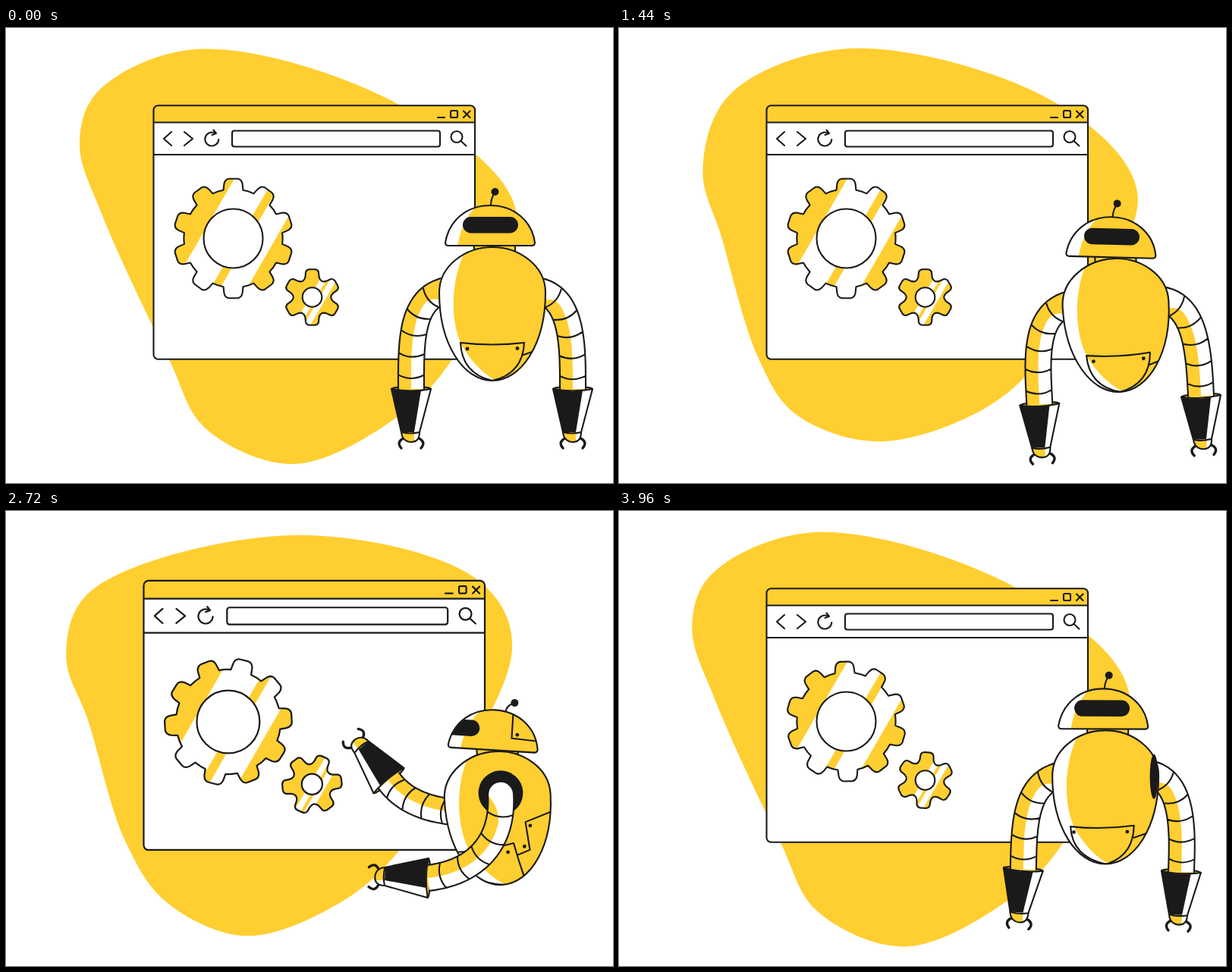
Recreate the animation shown at these times as an HTML page. Size 800 by 600 pixels, loop 4 s.

```html
<!DOCTYPE html>
<html lang="en">
<head>
<meta charset="utf-8">
<title>Robot and gears</title>
<style>
  html, body { margin: 0; width: 100%; height: 100%; overflow: hidden; background: #fff; }
  svg { display: block; width: 100vw; height: 100vh; }
  .line { fill: none; stroke: #1a1a1a; stroke-width: 2.1; stroke-linecap: round; stroke-linejoin: round; }
  .ink { fill: #1a1a1a; }
  .sun { fill: #ffce30; }
  .pale { fill: #fff; }
</style>
</head>
<body>
<svg viewBox="0 0 800 600">
  <defs>
    <clipPath id="frameClip"><rect x="195" y="102" width="423" height="335" rx="6"/></clipPath>
    <clipPath id="bodyClip"><path id="bodyShape" d="M0-88C35-88 70-64 70-28C70 40 38 88 0 88C-38 88-70 40-70-28C-70-64-35-88 0-88Z"/></clipPath>
    <clipPath id="headClip"><path id="headShape" d="M-59-4C-54-34-30-53 0-53C30-53 55-34 59-4Q59 0 55 0H-55Q-59 0-59-4Z"/></clipPath>
    <clipPath id="bigClip"><path/></clipPath>
    <clipPath id="smallClip"><path/></clipPath>
  </defs>
  <path id="blob" class="sun"/>
  <g id="window">
    <g clip-path="url(#frameClip)">
      <rect class="pale" x="195" y="102" width="423" height="335"/>
      <rect class="sun" x="195" y="102" width="423" height="22.5"/>
    </g>
    <g class="line">
      <rect x="194.5" y="102.2" width="423.5" height="334.5" rx="6"/>
      <path d="M195 124.5H618M195 167H618M569 118H578M603 109.5L611.5 118M611.5 109.5L603 118"/>
      <rect x="586" y="109" width="9" height="9" rx="1.5"/>
      <path d="M218 137L208 146L218 155M235 137L246 146L235 155"/>
      <path d="M280.3 147A9 9 0 1 1 276 138.8M273.5 134.5L277 139L271.5 141"/>
      <rect x="298" y="135.5" width="274" height="21" rx="3"/>
      <circle cx="594" cy="143.5" r="7.5"/>
      <path d="M599.5 149L606.5 155.5"/>
    </g>
    <g id="big" transform="translate(299.5 277.5)">
      <g clip-path="url(#bigClip)">
        <rect class="sun" x="-90" y="-90" width="180" height="180"/>
        <path class="pale" transform="skewX(-30)" d="M-44-90H8V90H-44ZM20.5-90H56V90H20.5Z"/>
      </g>
      <path class="line"/>
      <circle class="line" r="39" style="fill:#fff"/>
    </g>
    <g id="small" transform="translate(403.5 355)">
      <g clip-path="url(#smallClip)">
        <rect class="sun" x="-45" y="-45" width="90" height="90"/>
        <path class="pale" transform="skewX(-30)" d="M-3-45H5.5V45H-3ZM10-45H19V45H10Z"/>
      </g>
      <path class="line"/>
      <circle class="line" r="12.8" style="fill:#fff"/>
    </g>
  </g>
  <g id="robot"></g>
</svg>
<script>
const LOOP = 4000;
const $ = s => document.querySelector(s);
const mix = (a, b, k) => a + (b - a) * k;
const mixAll = (a, b, k) => a.map((v, i) => mix(v, b[i], k));
const rad = d => d * Math.PI / 180;
const fix = n => n.toFixed(2);
const poly = pts => 'M' + pts.map(p => p.map(fix)).join('L');
const ramp = (t, a, b) => {
  const u = Math.min(1, Math.max(0, (t - a) / (b - a)));
  return u * u * (3 - 2 * u);
};

// Smooth periodic curve through [time, value] keys, without overshoot.
function track(t, keys) {
  const n = keys.length;
  const T = i => keys[(i + n) % n][0] + Math.floor(i / n) * LOOP;
  const V = i => keys[(i + n) % n][1];
  const slope = i => (V(i + 1) - V(i)) / (T(i + 1) - T(i));
  const tangent = i => {
    const a = slope(i - 1), b = slope(i);
    return a * b <= 0 ? 0 : 2 * a * b / (a + b);
  };
  let i = n - 1;
  while (T(i) > t) i--;
  const h = T(i + 1) - T(i), u = (t - T(i)) / h, w = 1 - u;
  return V(i) * w * w * (1 + 2 * u) + V(i + 1) * u * u * (3 - 2 * u)
    + h * u * w * (w * tangent(i) - u * tangent(i + 1));
}

// Background blob: morphs through three outlines, a third of the loop each.
const BLOBS = [
  [97,153, 120,85, 250,28, 518,101, 672,240, 588,437, 510,517, 378,575, 262,527, 215,437, 127,247],
  [111,187, 146,88, 303,27, 580,102, 684,222, 560,432, 480,503, 340,545, 232,508, 185,437, 136,277],
  [79,192, 108,109, 380,32, 625,92, 667,180, 520,444, 440,516, 315,560, 210,515, 157,437, 108,277]
];
const BLOB_EASE = [u => Math.sin(u * Math.PI / 2), u => ramp(u, 0, 1), u => u ** 1.3];

// Closed centripetal spline through a flat list of coordinates.
function closedCurve(v) {
  const n = v.length / 2;
  const P = i => { const k = (i + n) % n * 2; return [v[k], v[k + 1]]; };
  const gap = i => Math.sqrt(Math.hypot(P(i + 1)[0] - P(i)[0], P(i + 1)[1] - P(i)[1]));
  const handle = (i, reach) => {
    const a = gap(i - 1), b = gap(i), [p, q, r] = [P(i - 1), P(i), P(i + 1)];
    return q.map((c, k) =>
      c + reach / 3 * ((c - p[k]) * b / a + (r[k] - c) * a / b) / (a + b));
  };
  let d = 'M' + P(0).map(fix);
  for (let i = 0; i < n; i++)
    d += 'C' + [handle(i, gap(i)), handle(i + 1, -gap(i)), P(i + 1)].map(p => p.map(fix)).join(' ');
  return d + 'Z';
}
function blobPath(t) {
  const s = t / LOOP * 3, i = Math.floor(s);
  return closedCurve(mixAll(BLOBS[i], BLOBS[(i + 1) % 3], BLOB_EASE[i](s - i)));
}

// Gear outline: teeth, outer radius, foot radius, tip and foot half-angles, valley radius.
function gearPath(n, R, foot, tip, base, valley) {
  const at = (r, a) => fix(r * Math.sin(rad(a))) + ' ' + fix(-r * Math.cos(rad(a)));
  const step = 360 / n, edge = tip * 1.2;
  let d = '';
  for (let i = 0; i < n; i++) {
    const a = i * step;
    d += (i ? 'L' : 'M') + at(foot, a - base) + 'L' + at(R * .92, a - edge)
      + 'Q' + at(R, a - tip) + ' ' + at(R, a - tip * .5)
      + 'L' + at(R, a + tip * .5)
      + 'Q' + at(R, a + tip) + ' ' + at(R * .92, a + edge)
      + 'L' + at(foot, a + base)
      + 'Q' + at(valley, a + step / 2) + ' ' + at(foot, a + step - base);
  }
  return d + 'Z';
}
function makeGear(name, d) {
  const parts = [$(`#${name}Clip path`), $(`#${name} > path`)];
  parts.forEach(p => p.setAttribute('d', d));
  return a => parts.forEach(p => p.setAttribute('transform', `rotate(${fix(a)})`));
}
const turnBig = makeGear('big', gearPath(10, 79, 65, 8, 11.5, 65.6));
const turnSmall = makeGear('small', gearPath(6, 37, 28, 12, 19, 22));

// Robot motion.
const REACH = [[0, 0], [1480, 0], [1700, .5], [2100, 1], [3000, 1], [3520, .75], [3920, .09]];
const DROP = [[0, 0], [800, 8], [1440, 15], [1650, 40], [2240, 42], [2720, 28], [3520, 24]];
const SHIFT = [[0, 0], [900, 0], [1440, 15], [2240, 9], [3520, 7]];
const TILT = [[0, 0], [900, 0], [1440, -3], [2720, -3], [3520, 2]];
const NOD = [[0, 0], [800, -5], [1440, 1.5], [2240, -2.5], [2720, 3.5], [3520, 2.5]];

// Arms relative to the body: shoulder, two handles, wrist, hand angle.
const LEFT = {
  hang: [-65, -30, -109, -17, -107, 43, -107, 99, 90],
  low: [-10, 22, -65, 30, -113, 18, -141, -3, 210],
  high: [-15, -8, -70, -8, -118, -20, -142, -57, 233]
};
// The right shoulder follows the turning body.
const RIGHT = {
  hang: [107, -17, 106, 48, 106, 99, 90],
  reach: [5, 32, -33, 70, -97, 74, 184]
};

// lit is the half (1 or -1) that covers the whole width at the shoulder.
function arm([x0, y0, x1, y1, x2, y2, x3, y3, angle], lit) {
  const at = (u, off, push = 0) => {
    const w = 1 - u;
    const pos = (a, b, c, d) => w*w*w*a + 3*w*w*u*b + 3*w*u*u*c + u*u*u*d;
    const vel = (a, b, c, d) => w*w*(b - a) + 2*w*u*(c - b) + u*u*(d - c);
    const vx = vel(x0, x1, x2, x3), vy = vel(y0, y1, y2, y3), l = Math.hypot(vx, vy) || 1;
    return [pos(x0, x1, x2, x3) + (push * vx - off * vy) / l,
            pos(y0, y1, y2, y3) + (push * vy + off * vx) / l];
  };
  const side = off => Array.from({ length: 25 }, (_, i) => at(i / 24, off(i / 24)));
  const a = side(() => 17), b = side(() => -17);
  const m = side(u => -lit * 17 * Math.max(0, 1 - u / .25) ** 2);
  const rings = [.14, .36, .54, .72, .89].map(u =>
    `M${at(u, 17).map(fix)}Q${at(u, 0, 9).map(fix)} ${at(u, -17).map(fix)}`).join('');
  const place = `transform="translate(${fix(x3)} ${fix(y3)}) rotate(${fix(angle)})"`;
  return `
    <ellipse ${place} class="line" rx="3" ry="26" style="fill:#ffce30"/>
    <circle class="line" cx="${fix(x0)}" cy="${fix(y0)}" r="17" style="fill:#fff"/>
    <path class="pale" d="${poly([...a, ...b.slice().reverse()])}Z"/>
    <path class="sun" d="${poly([...a, ...m.reverse()])}Z"/>
    <path class="line" d="${poly(a)}${poly(b)}${rings}"/>
    <g ${place}>
      <path class="line" d="M65 10Q70 20 78 13M65-10Q70-20 78-13" style="stroke-width:3.4"/>
      <path class="sun" d="M57 13C68 12 70 4 70 0C70-5 68-11 57-11Z"/>
      <path class="pale" d="M57-4L68-4C67-9 64-11 57-11Z"/>
      <path class="line" d="M57 13C68 12 70 4 70 0C70-5 68-11 57-11"/>
      <path class="pale" d="M0 26Q5 0 0-26L57-11V13Z"/>
      <path class="ink" d="M0 26Q5 5 2-13L57-4V13Z"/>
      <path class="line" d="M0 26Q5 0 0-26L57-11Q60 1 57 13Z"/>
    </g>`;
}

const dot = (x, y, r = 2.4) => `<circle class="ink" cx="${fix(x)}" cy="${fix(y)}" r="${r}"/>`;

// q runs from 0 (front view) to 1 (side view).
function body(q) {
  const cx = mix(42, 18, q), cy = mix(38, 34, q), lx = mix(-42, -64, q);
  const pocket = `M${mix(0, 30, q)} ${mix(88, 80, q)}Q${mix(40, 23, q)} ${mix(79, 56, q)} ${cx} ${cy}`
    + `Q${(cx + lx) / 2} 43 ${lx} ${mix(38, 42, q)}Q${mix(-40, -60, q)} 79 0 88`;
  const panel = `M${mix(100, 70, q)} ${mix(0, -5, q)}L${mix(75, 35, q)} 7L${mix(70, 39, q)} 44`
    + `L${mix(41, 22, q)} ${mix(54, 50, q)}`;
  return `
    <g clip-path="url(#bodyClip)">
      <rect class="pale" x="-80" y="-95" width="160" height="190"/>
      <path class="sun" d="M-28-95C-55-60-60 15-35 50C-25 65-10 82 12 92H80V-95Z"/>
      <path class="line" d="${pocket}${panel}"/>
      ${dot(mix(-33, -80, q), 46)}${dot(mix(33, 10, q), 45.5)}
      ${dot(mix(82, 41, q), 12)}${dot(mix(75, 32, q), 39)}
    </g>
    <use href="#bodyShape" class="line"/>`;
}

function head(tilt, q) {
  const seam = x => mix(x + 62, x, q);
  const bx = mix(1, 14, q), by = mix(-53, -51, q), ax = mix(6.5, 25, q), ay = mix(-71, -64, q);
  return `<g transform="translate(-3 -90) rotate(${fix(tilt)})">
    <path class="line" d="M${bx} ${by}Q${bx} ${by - 9} ${ax} ${ay}"/>
    ${dot(ax, ay, 5)}
    <g clip-path="url(#headClip)">
      <rect class="pale" x="-62" y="-56" width="124" height="60"/>
      <path class="sun" d="M-14-55Q-37-38-43 2H62V-55Z"/>
      <rect class="ink" x="${mix(-36, -92, q)}" y="-38" width="73" height="21.5" rx="10.7"/>
      <path class="line" d="M${seam(24)}-54L${seam(24)}-17L${seam(62)}-15"/>
      ${dot(seam(31), -22)}
    </g>
    <use href="#headShape" class="line"/>
  </g>`;
}

function robot(t) {
  const reach = track(t, REACH), tilt = track(t, TILT);
  const turn = rad(86 * reach ** .6), q = Math.sin(turn);
  const sway = Math.sin(Math.PI * Math.min(1, t / 1440));
  const poke = ramp(t, 1800, 2600) - ramp(t, 2900, 3500);

  const l = mixAll(LEFT.hang, mixAll(LEFT.low, LEFT.high, poke), Math.min(1, reach * 1.2));
  const r = [65 * Math.cos(turn), -29.5 - 1.5 * q, ...mixAll(RIGHT.hang, RIGHT.reach, reach)];
  l[6] -= 4 * sway;
  l[8] += 6 * sway;
  r[6] += 4 * sway;
  r[8] -= 4 * sway;

  const right = arm(r, -1);
  const ring = `<ellipse class="ink" cx="${fix(r[0])}" cy="${fix(-26 - 7 * q)}" rx="${fix(29.5 * q)}" ry="29.5"/>`;
  const torso = body(q) + (q ? ring : '');
  return `<g transform="translate(${fix(641 + track(t, SHIFT))} ${fix(377 + track(t, DROP))}) rotate(${fix(tilt)})">
    ${arm(l, 1)}
    <rect class="line" x="-24" y="-93" width="54" height="10" style="fill:#ffce30"/>
    ${q > .35 ? torso + right : right + torso}
    ${head(track(t, NOD) - tilt, Math.min(1, reach * 1.33))}
  </g>`;
}

function draw(t) {
  $('#blob').setAttribute('d', blobPath(t));
  const zoom = 1 - .03 * ramp(t, 2020, 2240) + .0915 * ramp(t, 2280, 2560) - .0615 * ramp(t, 3600, 3880);
  $('#window').setAttribute('transform',
    `translate(406.5 269.5) scale(${zoom.toFixed(4)}) translate(-406.5 -269.5)`);
  const spin = Math.max(0, (t - 2400) / 1600);
  turnBig(72 * spin);
  turnSmall(-180 * spin);
  $('#robot').innerHTML = robot(t);
}

const start = performance.now();
function loop() {
  draw(Math.max(0, performance.now() - start) % LOOP);
  requestAnimationFrame(loop);
}
loop();
</script>
</body>
</html>
```
